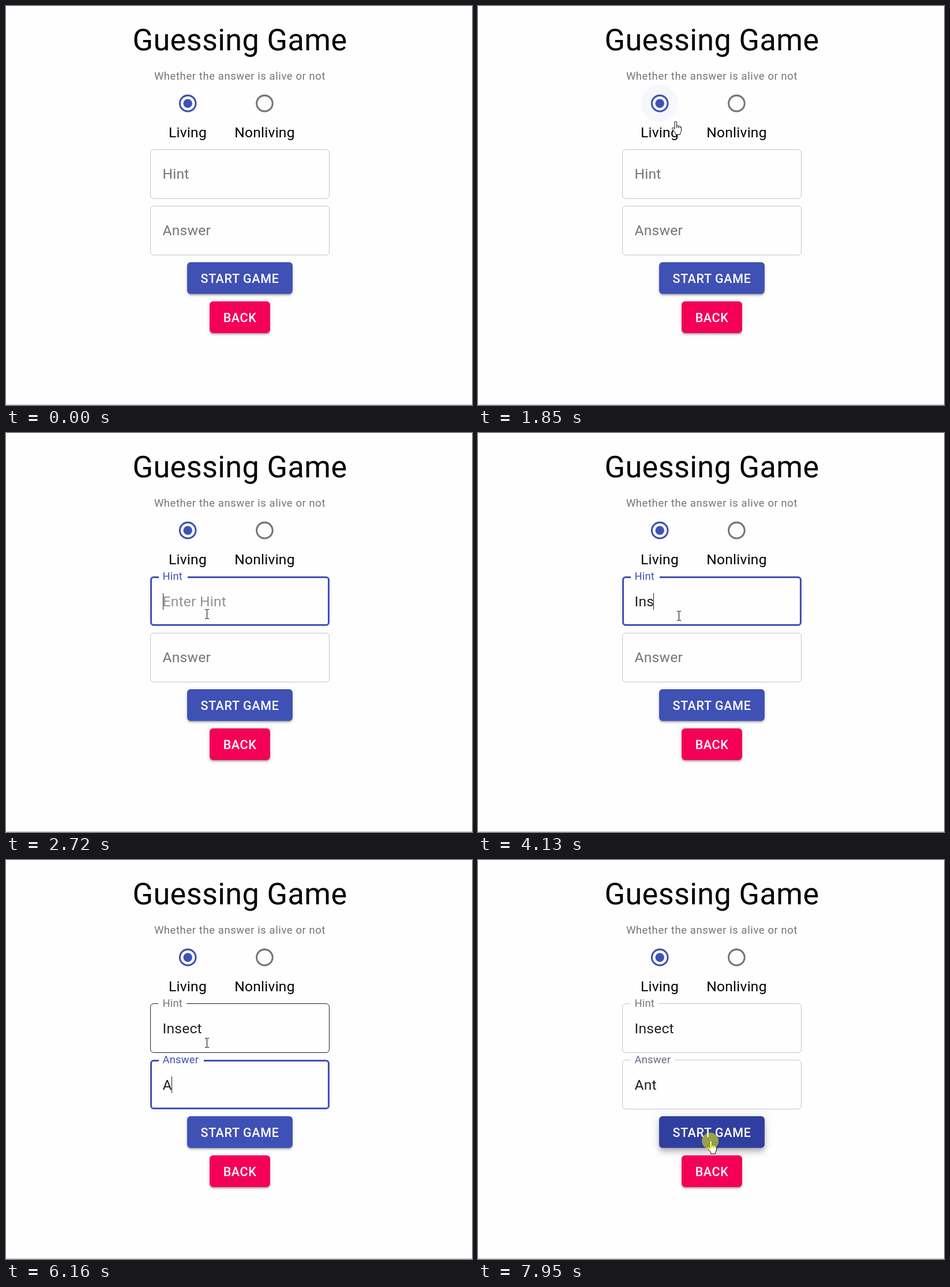
Recreate the animation shown at these times as an HTML page. Size 808 by 693 pixels, loop 8000 ms.

```html
<!DOCTYPE html>
<html lang="en">
<head>
<meta charset="utf-8">
<title>Guessing Game</title>
<style>
  html, body { margin: 0; width: 100%; height: 100%; overflow: hidden; background: #fefefe; }
  svg { position: absolute; left: 0; top: 0; }
  text { font-family: Roboto, sans-serif; font-size: 24.58px; letter-spacing: .00938em; }
  .mid { text-anchor: middle; }
  .title { font-size: 52.2px; letter-spacing: .00735em; }
  .note { font-size: 18.43px; letter-spacing: .0333em; fill: #757575; }
  .cap { font-size: 21.5px; font-weight: 500; letter-spacing: .02857em; fill: #fff; }
  .btn { position: absolute; height: 55px; border-radius: 6px; }
  #start { left: 314px; top: 445px; width: 183px; }
  #back { left: 353px; top: 513px; width: 105px; background: #f50057; }
</style>
</head>
<body>
<div class="btn" id="start"></div>
<div class="btn" id="back"></div>
<svg width="808" height="693">
  <rect y="692" width="808" height="1" fill="#bdbdbd"/>
  <text class="mid title" x="405.5" y="77">Guessing Game</text>
  <text class="mid note" x="405.5" y="128">Whether the answer is alive or not</text>

  <circle id="haloA" cx="315.2" cy="169.2" r="32.2" fill="#3f51b5"/>
  <circle id="haloB" cx="448.4" cy="169.2" r="32.2"/>
  <g fill="none" stroke-width="3.07">
    <circle cx="315.2" cy="169.2" r="13.8" stroke="#3f51b5"/>
    <circle cx="448.4" cy="169.2" r="13.8" stroke="#757575"/>
  </g>
  <circle cx="315.2" cy="169.2" r="7.7" fill="#3f51b5"/>
  <text class="mid" x="315" y="228">Living</text>
  <text class="mid" x="448.5" y="228">Nonliving</text>

  <g id="fields"></g>

  <text class="mid cap" x="405.5" y="481">START GAME</text>
  <text class="mid cap" x="405.5" y="548.5">BACK</text>

  <g id="cursor" stroke="#000" fill="#fff" stroke-linejoin="round">
    <path id="arrow" d="M.5 .5V16.5L4.2 13 6.7 18.6 9 17.6 6.6 12H11.5Z"/>
    <path id="beam" fill="none" d="M-3.5 -8H-1.2Q0 -8 0 -7Q0 -8 1.2 -8H3.5M0 -7V7M-3.5 8H-1.2Q0 8 0 7Q0 8 1.2 8H3.5"/>
    <g id="hand" transform="translate(-6.8 0)">
      <path d="M5 13.5V2.3a1.8 1.8 0 0 1 3.6 0V8.6a1.6 1.6 0 0 1 3 .6a1.5 1.5 0 0 1 2.8 .6a1.4 1.4 0 0 1 2.2 .9V15c0 3-1.3 4.5-2 6.3V23.4H6.8V21.5C5.5 19 3 16 1 13.5c-1-1.7 .8-2.9 2.2-1.7Z"/>
      <path fill="none" d="M8.6 8.6V12M11.6 9.2V12M14.4 9.8V12"/>
    </g>
  </g>
  <circle id="press" cx="402.7" cy="488" r="14.5" fill="#ff0" opacity=".5"/>
</svg>
<script>
const LOOP = 8000, BLINK = 530, NS = 'http://www.w3.org/2000/svg';
const $ = id => document.getElementById(id);
const clamp = u => Math.min(1, Math.max(0, u));
const mix = (a, b, p) => a + (b - a) * p;
const blend = (a, b, p) => `rgb(${a.map((v, i) => Math.round(mix(v, b[i], p)))})`;
const set = (el, attrs) => { for (const k in attrs) el.setAttribute(k, attrs[k]); };
const show = (el, on) => { el.style.display = on ? '' : 'none'; };

const GREY = [117, 117, 117], BLUE = [63, 81, 181], NAVY = [48, 63, 159];

// Screen updates: start, end, number of steps
const BURSTS = [
  [300, 1080, 11], [1160, 1850, 10], [2010, 2720, 10], [3050, 3200, 3],
  ...[3580, 3810, 3980, 4130, 4280, 4600, 4850].map(t => [t, t, 1]),
  [5150, 5310, 3],
  ...[5610, 6160, 6310, 6480, 7030].map(t => [t, t, 1]),
  [7410, 7640, 4], [7870, 7950, 2]
];

function snap(t) {
  let shown = 0;
  for (const [a, b, n] of BURSTS) {
    if (t < a) break;
    const step = (b - a) / (n - 1);
    shown = t >= b ? b : a + Math.floor((t - a) / step) * step;
  }
  return shown;
}

// cubic-bezier(p, 0, .2, 1)
function ease(u, p = 0) {
  u = clamp(u);
  if (u === 0 || u === 1) return u;
  let lo = 0, hi = 1, s;
  for (let i = 0; i < 24; i++) {
    s = (lo + hi) / 2;
    const x = 3 * p * s * (1 - s) ** 2 + .6 * s * s * (1 - s) + s ** 3;
    if (x < u) lo = s; else hi = s;
  }
  return s * s * (3 - 2 * s);
}

// Pointer moves: start, end, from, to
const MOVES = [
  [300, 1080, [670, 576], [457.8, 211]],
  [1160, 1700, [457.8, 211], [342.8, 200]],
  [2010, 2450, [342.8, 200], [348.5, 314.5]],
  [3050, 3200, [348.5, 314.5], [348.5, 317.5]],
  [7410, 7563, [400, 500], [403.8, 487]]
];

function pointer(t) {
  let pos = MOVES[0][2];
  for (const [a, b, from, to] of MOVES) {
    if (t < a) break;
    const u = clamp((t - a) / (b - a)), p = u * u * (3 - 2 * u);
    pos = from.map((v, i) => mix(v, to[i], p));
  }
  return pos;
}

const within = ([x, y], l, t, r, b) => x >= l && x <= r && y >= t && y <= b;

const FIELDS = [
  { name: 'Hint', top: 249, notch: 49, focus: 2515, blur: 5080, word: 'Insect',
    keys: [3810, 3980, 4130, 4280, 4600, 4850] },
  { name: 'Answer', top: 347, notch: 77, focus: 5080, blur: 7882, word: 'Ant',
    keys: [6160, 6310, 6480] }
];

function add(tag, attrs, text = '') {
  const el = document.createElementNS(NS, tag);
  set(el, attrs);
  el.textContent = text;
  return $('fields').appendChild(el);
}

for (const f of FIELDS) {
  const y = f.top + 52;
  f.frame = add('rect', { fill: 'none' });
  f.gap = add('rect', { y: f.top - 1, height: 5, fill: '#fefefe' });
  f.label = add('text', { x: 271.5 }, f.name);
  f.hold = add('text', { x: 271.5, y, fill: '#000' }, 'Enter ' + f.name);
  f.value = add('text', { x: 271.5, y, fill: '#212121' });
  f.caret = add('rect', { y: f.top + 29, width: 1, height: 29, fill: '#212121' });
}

function drawField(f, t, at) {
  const focused = t >= f.focus && t < f.blur;
  const hover = within(at, 250, f.top, 561, f.top + 86);
  const line = focused ? 3 : 1;
  set(f.frame, {
    x: 250 + line / 2, y: f.top + line / 2, width: 311 - line, height: 86 - line,
    rx: 6.1 - line / 2, 'stroke-width': line,
    stroke: focused ? '#3f51b5' : hover ? '#212121' : '#c4c4c4'
  });
  const open = Math.max(0, (t - f.focus - 67) * 5);
  set(f.gap, { x: focused ? 265 : 264, width: Math.min(open, f.notch + (focused ? 1 : 0)) });

  const p = ease((t - f.focus) / 200);
  set(f.label, {
    y: f.top + 51 - 45 * p,
    fill: blend(GREY, BLUE, p - ease((t - f.blur) / 200))
  });
  f.label.style.fontSize = 24.58 - 6.15 * p + 'px';

  const typed = f.keys.filter(k => k <= t);
  f.value.textContent = f.word.slice(0, typed.length);
  set(f.hold, { opacity: focused && !typed.length ? .42 * ease((t - f.focus) / 200, .4) : 0 });

  const last = typed.length ? typed[typed.length - 1] : f.focus;
  const lit = focused && Math.floor((t - last) / BLINK) % 2 === 0;
  show(f.caret, lit);
  if (lit) {
    const w = typed.length ? f.value.getComputedTextLength() : 0;
    set(f.caret, { x: Math.max(272, Math.floor(271.2 + w)) });
  }
}

// Three layers of y offset, blur, spread
const REST = [3, 1, -2, 2, 2, 0, 1, 5, 0];
const RAISED = [2, 4, -1, 4, 5, 0, 1, 10, 0];
const PRESSED = [5, 5, -3, 8, 10, 1, 3, 14, 2];
const shadow = e => [.2, .14, .12].map((a, i) =>
  `0 ${e.slice(i * 3, i * 3 + 3).map(v => v * 1.536 + 'px').join(' ')} rgba(0,0,0,${a})`).join();

const fade = (t, on, off) => .04 * (ease((t - on) / 150, .4) - ease((t - off) / 150, .4));

function draw(time) {
  const t = snap(time), at = pointer(t);
  set($('haloA'), { opacity: fade(t, 1650, 2150) });
  set($('haloB'), { opacity: fade(t, 1060, 1400) });
  for (const f of FIELDS) drawField(f, t, at);

  const over = ease((t - 7390) / 250, .4), down = ease((t - 7882) / 250, .4);
  const level = REST.map((v, i) => mix(mix(v, RAISED[i], over), PRESSED[i], down));
  $('start').style.background = blend(BLUE, NAVY, over);
  $('start').style.boxShadow = shadow(level);

  const text = FIELDS.some(f => within(at, 250, f.top, 561, f.top + 86));
  const link = within(at, 282, 137, 348, 235) || within(at, 397, 137, 500, 235)
    || within(at, 314, 445, 497, 500);
  show($('cursor'), t >= 300);
  set($('cursor'), { transform: `translate(${at})` });
  show($('beam'), text);
  show($('hand'), link);
  show($('arrow'), !text && !link);
  show($('press'), t >= 7870);
}

$('back').style.boxShadow = shadow(REST);
const begin = performance.now();
function tick() {
  draw((performance.now() - begin) % LOOP);
  requestAnimationFrame(tick);
}
tick();
</script>
</body>
</html>
```
